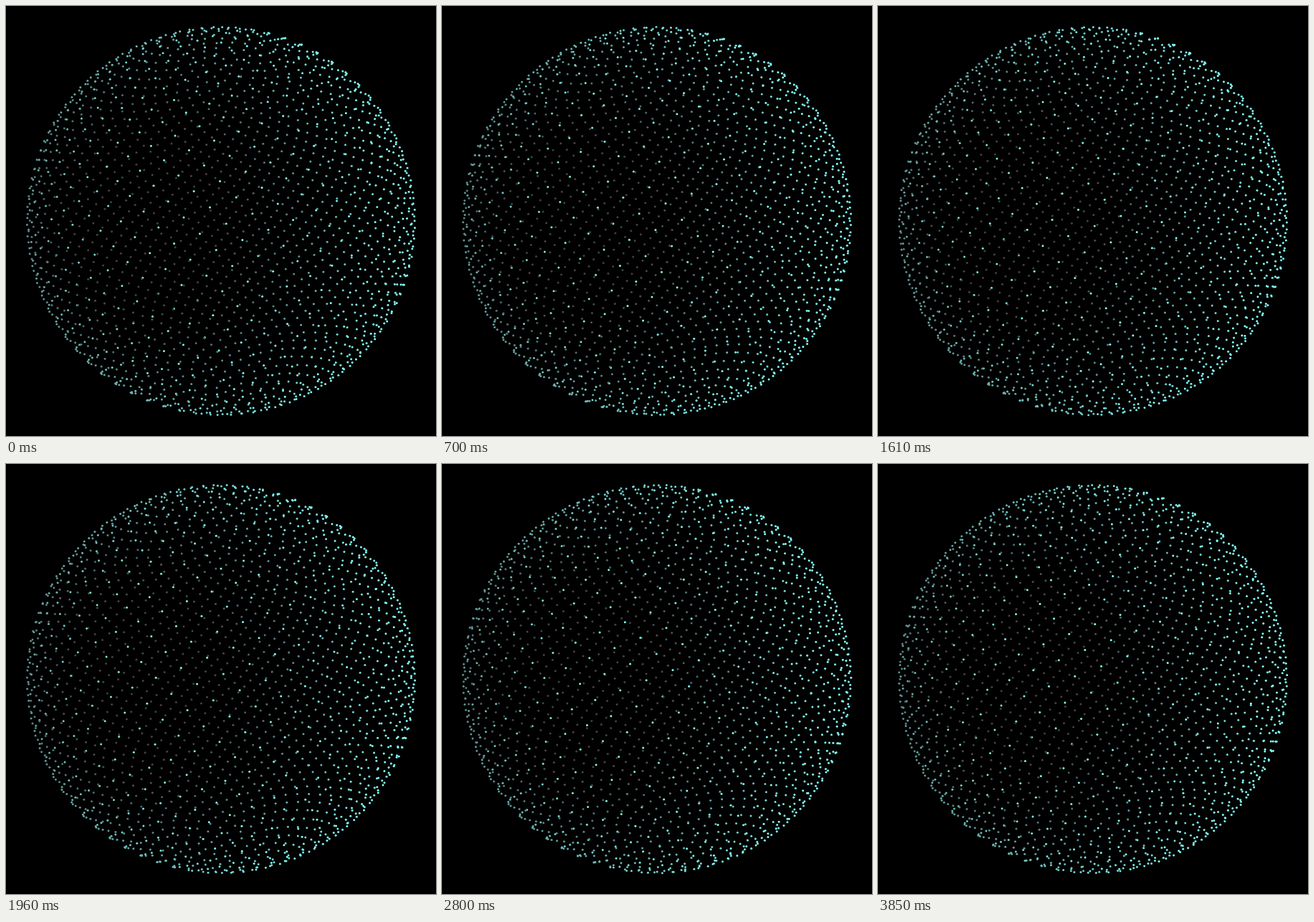
Animation, 600 px wide and 600 px high, one loop 3.92 s. Source, as an HTML page with a canvas:

```html
<!DOCTYPE html>
<html>
<head>
<meta charset="utf-8">
<title>Dotted sphere</title>
<style>
  html, body { margin: 0; height: 100%; overflow: hidden; background: #000; }
  canvas { display: block; width: 600px; height: 600px; }
</style>
</head>
<body>
<canvas id="stage" width="600" height="600"></canvas>
<script>
const ctx = document.getElementById('stage').getContext('2d');

const COUNT = 2157;
const GOLDEN = Math.PI * (3 - Math.sqrt(5));
const FOCAL = 519.6;      // 60 degree field of view
const DISTANCE = 2.164;   // camera to centre, in sphere radii
const MIDDLE = 1066;      // dot near the equator that fixes the phase
const PHASE = -6.73;      // its longitude at the start, in degrees
const RADIUS = 1.5;

const LOOP = 3920, STEP = 70;
const HELD = [20, 29, 50];  // steps that repeat the picture before them
const TURN = [[0, 0], [10, 8.86], [17, 15.2], [28, 25.3], [40, 35.3], [47, 41.35], [55, 49.05]];

const rad = deg => deg * Math.PI / 180;

function turnAt(step) {
  const k = TURN.findIndex(([s]) => s >= step);
  if (k < 1) return 0;
  const [s0, a0] = TURN[k - 1], [s1, a1] = TURN[k];
  return a0 + (a1 - a0) * (step - s0) / (s1 - s0);
}

function drawDot(i, turn) {
  const lon = rad(PHASE - turn) + (i - MIDDLE) * GOLDEN;
  const y = (2 * i + 1) / COUNT - 1;
  const ring = Math.sqrt(1 - y * y);
  const x = ring * Math.sin(lon), z = ring * Math.cos(lon);
  const scale = FOCAL / (DISTANCE - z);

  // lit from the right, fading to grey with depth
  const light = Math.max(0.24, Math.min(1, 0.66 + 0.33 * x + 0.4 * z));
  ctx.fillStyle = `rgb(${48 + 82 * light}, ${5 + 250 * light}, ${8 + 242 * light})`;
  ctx.beginPath();
  ctx.arc(300 + x * scale, 300 + y * scale, RADIUS, 0, 2 * Math.PI);
  ctx.fill();
}

function draw(time) {
  let step = Math.floor(time % LOOP / STEP);
  if (HELD.includes(step)) step--;
  const turn = turnAt(step);
  ctx.fillStyle = '#000';
  ctx.fillRect(0, 0, 600, 600);
  for (let i = 0; i < COUNT; i++) drawDot(i, turn);
}

const start = performance.now();
function tick() {
  draw(performance.now() - start);
  requestAnimationFrame(tick);
}
tick();
</script>
</body>
</html>
```
